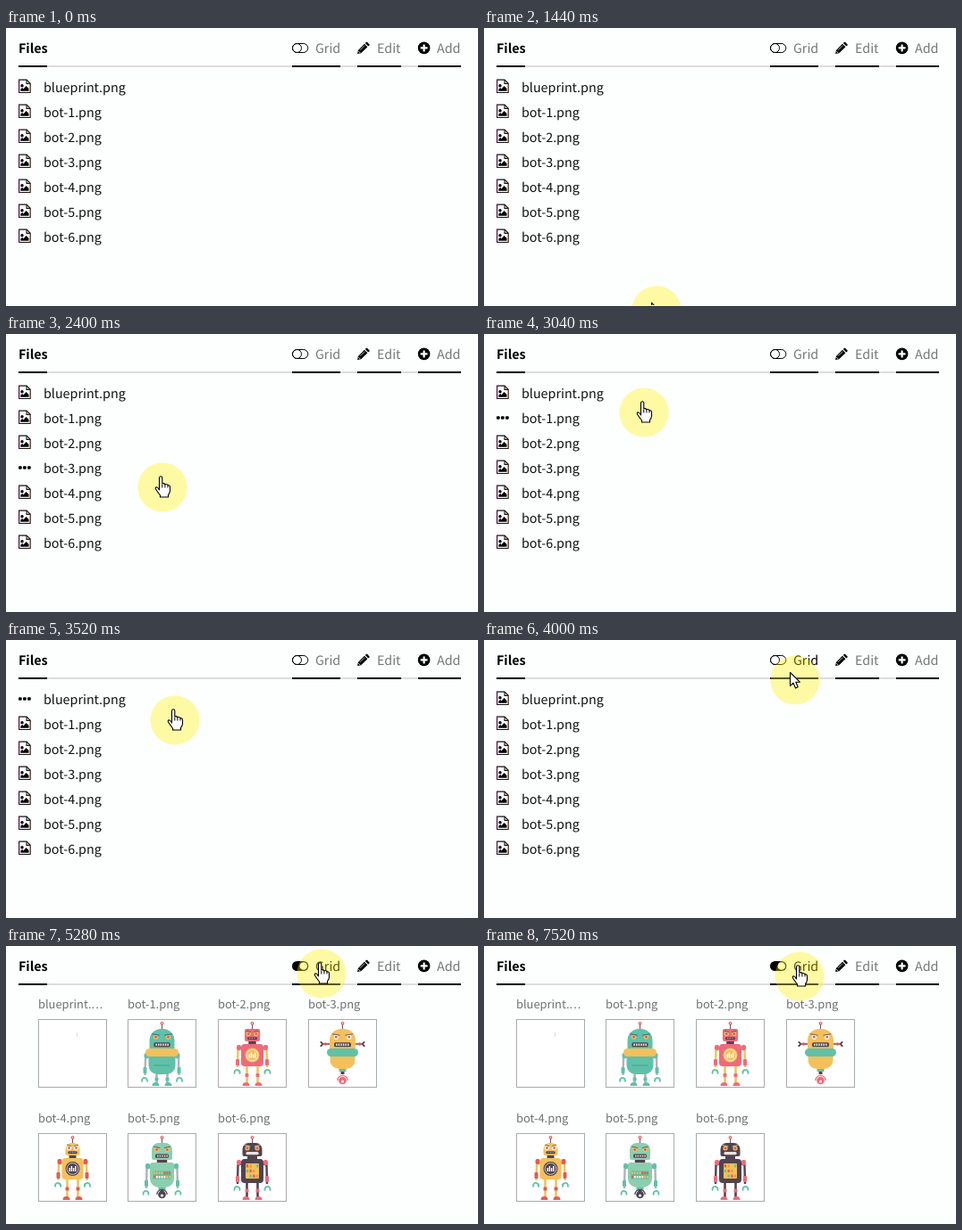
Animation of 528x312 px, one loop 8 s. Source, as an HTML page with a canvas:

```html
<!DOCTYPE html>
<html lang="en">
<head>
<meta charset="utf-8">
<title>Files</title>
<style>
html, body { margin: 0; width: 100%; height: 100%; overflow: hidden; background: #fdfefe; }
canvas { display: block; width: 528px; height: 312px; }
</style>
</head>
<body>
<canvas id="stage" width="528" height="312"></canvas>
<script>
const ctx = document.getElementById('stage').getContext('2d', { alpha: false });
const LOOP = 8000, STEP = 160, TAU = Math.PI * 2;
const FONT = '"Noto Sans CJK JP", "Noto Sans CJK SC", "Noto Sans CJK", "Open Sans", sans-serif';
const FILES = ['blueprint.png', ...[1, 2, 3, 4, 5, 6].map(n => `bot-${n}.png`)];
const BG = '#fdfefe', TEAL = '#5fc1a9', PINK = '#ef6a7b', GOLD = '#f5c05b',
      DARK = '#51434f', RED = '#e05a58', MINT = '#8ccfae', GREY = '#b0b3b8';

// time, x and y of the pointer highlight
const PATH = [
  [1440, 193, 317], [2240, 176, 174], [2400, 175, 172], [3040, 179, 88], [3280, 185, 76],
  [3520, 189, 90], [4000, 348, 45], [4320, 353, 31], [7200, 353, 31], [7520, 353, 34]
];

function pointer(t) {
  if (t < PATH[0][0]) return null;
  const i = PATH.findIndex(p => p[0] > t);
  if (i < 0) return PATH[PATH.length - 1].slice(1);
  const [t0, x0, y0] = PATH[i - 1], [t1, x1, y1] = PATH[i];
  const k = (t - t0) / (t1 - t0);
  return [x0 + (x1 - x0) * k, y0 + (y1 - y0) * k];
}

// The page reacts slightly later than the pointer moves.
function hoverRow(t) {
  const p = pointer(t - 40);
  if (!p || p[0] > 300) return -1;
  const row = Math.floor((p[1] - 64) / 28);
  return row >= 0 && row < FILES.length ? row : -1;
}

function text(s, x, y, size, color, weight = 400) {
  ctx.font = `${weight} ${size}px ${FONT}`;
  ctx.fillStyle = color;
  ctx.fillText(s, x, y);
}
function box(color, x, y, w, h, r = 0) {
  ctx.fillStyle = color;
  ctx.beginPath();
  ctx.roundRect(x, y, w, h, r);
  ctx.fill();
}
function mid(color, y, w, h, r) {
  box(color, -w / 2, y, w, h, r);
}
function dot(color, x, y, r) {
  ctx.fillStyle = color;
  ctx.beginPath();
  ctx.arc(x, y, r, 0, TAU);
  ctx.fill();
}
function trace(pts) {
  ctx.beginPath();
  for (let i = 0; i < pts.length; i += 2) ctx.lineTo(pts[i], pts[i + 1]);
}
function line(color, width, ...pts) {
  trace(pts);
  ctx.strokeStyle = color;
  ctx.lineWidth = width;
  ctx.stroke();
}
function poly(color, ...pts) {
  trace(pts);
  ctx.fillStyle = color;
  ctx.fill();
}
function arc(color, width, x, y, r, a = 0, b = TAU) {
  ctx.beginPath();
  ctx.arc(x, y, r, a, b);
  ctx.strokeStyle = color;
  ctx.lineWidth = width;
  ctx.stroke();
}
function at(x, y, draw) {
  ctx.save();
  ctx.translate(x, y);
  draw();
  ctx.restore();
}
function both(draw) {
  draw();
  ctx.save();
  ctx.scale(-1, 1);
  draw();
  ctx.restore();
}

function fileIcon() {
  const ink = ctx.createLinearGradient(0, 0, 14, 0);
  ink.addColorStop(0, '#4a1040');
  ink.addColorStop(0.3, '#111');
  ink.addColorStop(0.8, '#111');
  ink.addColorStop(1, '#4a2810');
  line(ink, 1.2, 0.6, 0.6, 9, 0.6, 13.2, 4.8, 13.2, 15, 0.6, 15, 0.6, 0);
  line(ink, 1.1, 9, 0.6, 9, 4.9, 13.2, 4.9);
  dot('#000', 4, 7.2, 1.7);
  poly('#000', 2.3, 13.2, 2.3, 11.3, 4.2, 9.6, 5.5, 10.9, 8.6, 7.5, 11.5, 10.5, 11.5, 13.2);
}
function moreIcon() {
  for (let i = 0; i < 3; i++) box('#000', i * 5, 0, 3.7, 3.6, 1.1);
}
function toggleIcon(on) {
  if (on) {
    box('#000', 0, 0, 18.3, 11, 5.5);
    dot(BG, 12.8, 5.5, 4.3);
    return;
  }
  ctx.beginPath();
  ctx.roundRect(0.5, 0.5, 17.3, 10, 5);
  ctx.strokeStyle = '#000';
  ctx.lineWidth = 1;
  ctx.stroke();
  arc('#000', 1, 5.5, 5.5, 5);
}
function pencilIcon() {
  poly('#000', 0, 13.4, 0.9, 9.3, 8, 2.2, 11.4, 5.6, 4.2, 12.6);
  poly('#000', 8.8, 1.4, 10, 0.2, 11, 0.2, 13.4, 2.6, 13.4, 3.6, 12.2, 4.8);
  line(BG, 1, 1.4, 10.6, 3, 12.2);
  line(BG, 0.7, 3, 9.2, 8.2, 4);
}
function addIcon() {
  dot('#000', 0, 0, 6.8);
  box(BG, -4, -1.1, 8, 2.2, 0.4);
  box(BG, -1.1, -4, 2.2, 8, 0.4);
}

function header(t, grid) {
  box('#ddd', 14, 42, 495, 2);
  for (const [x, w] of [[14, 32], [320, 54], [393, 49], [461, 48]]) box('#000', x, 42, w, 2);
  text('Files', 14, 28, 14.32, '#000', 700);
  text('Grid', 346, 28, 14.32, t >= 4000 ? '#000' : '#777');
  text('Edit', 415, 28, 14.32, '#777');
  text('Add', 482, 28, 14.32, '#777');
  at(320, 17, () => toggleIcon(grid));
  at(393, 15.6, pencilIcon);
  at(467.6, 22.4, addIcon);
}

function list(t) {
  const hover = hoverRow(t);
  FILES.forEach((name, i) => {
    const y = 66 + i * 28;
    if (i === hover) at(14, y - 1.8, moreIcon);
    else at(14, y - 8.5, fileIcon);
    text(name, 42, y + 6, 14.32, '#111');
  });
}

// Chest decorations, centred on height y
function dial(ground) {
  return y => {
    dot(ground, 0, y, 8);
    arc('#fff', 0.7, 0, y, 6.4);
    for (let i = 0; i < 4; i++) box('#fff', -4 + i * 2.2, y - 1 - (i % 2) * 2, 1.4, 4 + (i % 2) * 2);
  };
}
function lamps(ground, w, h, cols, rows, colors) {
  return y => {
    mid(ground, y - h / 2, w, h, 1);
    const dx = w / cols, dy = h / rows;
    for (let i = 0; i < cols * rows; i++) {
      const cx = (i % cols + 0.5) * dx - w / 2, cy = y - h / 2 + (Math.floor(i / cols) + 0.5) * dy;
      box(colors[(i * 3 + (i >> 2)) % colors.length], cx - dx * 0.3, cy - dy * 0.28, dx * 0.6, dy * 0.56);
    }
  };
}
const seam = y => mid('#489f8b', y + 2, 18, 1);

// head and body are widths; neck and hip are heights in the frame
const ROBOTS = [
  { skin: TEAL, trim: TEAL, limb: GREY, head: 28, neck: 34, body: 30, hip: 62, dome: 13, belt: GOLD, chest: seam },
  { skin: PINK, trim: PINK, limb: GOLD, head: 17, neck: 25, body: 25, hip: 53, dome: 2, chest: dial(GOLD) },
  { skin: GOLD, trim: PINK, limb: DARK, head: 29, neck: 34, body: 28, hip: 56, dome: 13, belt: TEAL, tail: true, wings: true },
  { skin: GOLD, trim: RED, limb: GOLD, head: 16, neck: 25, body: 24, hip: 52, dome: 7, chest: dial(DARK) },
  { skin: MINT, trim: TEAL, limb: GREY, head: 23, neck: 30, body: 27, hip: 61, dome: 8, tail: true,
    chest: lamps('#6db795', 20, 9, 7, 2, [GOLD, RED, '#fff']) },
  { skin: DARK, trim: PINK, limb: DARK, head: 22, neck: 26, body: 25, hip: 56, dome: 7,
    chest: lamps(GOLD, 15, 17, 4, 3, [RED, TEAL, GOLD, '#e99a42']) }
];

function robot({ skin, trim, limb, head, neck, body, hip, dome, belt, chest, tail, wings }) {
  const tall = neck - 11, eyes = 11 + tall * 0.4, side = body / 2, ink = skin === DARK ? '#e9e4dc' : DARK;
  line(DARK, 0.9, 0, 5, 0, 12);
  dot(RED, 0, 4.8, 1.9);
  dot('#fff', 0, 4.8, 0.7);
  both(() => {
    if (wings) {
      line(DARK, 1.4, side, 28, side + 9, 28);
      dot(RED, side + 5, 28, 1.7);
      arc(DARK, 1.8, side + 11, 28, 2.2, TAU / 4, TAU * 0.75);
    } else {
      line(limb, 2.4, side - 1, neck + 8, side + 3.5, neck + 10, side + 4, hip + 1);
      box(trim, side, neck + 4, 5, 6, 2);
      box(trim, side + 2, hip - 8, 4, 7, 1);
      arc(TEAL, 1.8, side + 4.5, hip + 7, 3, -TAU * 0.58, TAU * 0.08);
    }
    if (!tail) {
      line(limb, 2.6, 6, hip - 2, 6, 72);
      box(trim, 4, (hip + 69) / 2, 4, 4, 1);
      box(trim, 3, 71, 8, 4, [4, 4, 0, 0]);
    }
  });
  if (tail) {
    mid(TEAL, hip - 1, 8, 4);
    mid(DARK, hip + 3, 4, 3);
    dot(wings ? PINK : DARK, 0, 69, 4.3);
    arc(wings ? PINK : DARK, 1.2, 0, 69, 5.6, TAU / 2, TAU);
    dot('#fff', 0, 70, 1.6);
  }
  mid(DARK, neck - 1, head * 0.5, 5);
  mid(skin, 11, head, tall, [dome, dome, 2, 2]);
  mid(skin, neck + 3, body, hip - neck - 3, belt || tail ? [3, 3, 10, 10] : 4);
  if (belt) mid(belt, neck - 1, body + 7, 9, 4.5);
  both(() => {
    dot(skin === GOLD ? '#fff' : GOLD, head * 0.25, eyes, 2.6);
    dot(RED, head * 0.25, eyes, 1.4);
    line(ink, 0.8, head * 0.1, eyes - 2, head * 0.4, eyes - 3.5);
  });
  const jaw = 11 + tall * 0.66, grin = head * 0.65;
  mid(ink, jaw, grin, tall * 0.22, 1.5);
  for (let x = 2 - grin / 2; x < grin / 2 - 2; x += 2.6) box('#e9e4dc', x, jaw + 1.2, 1.5, tall * 0.22 - 2.4);
  if (chest) chest((neck + hip) / 2 + 1.5);
}

function gallery() {
  FILES.forEach((name, i) => {
    const x = Math.floor(36 + (i % 4) * 100.67), y = i < 4 ? 82 : 210;
    const label = i ? name : name.slice(0, 10);
    text(label, x, y - 12, 12.89, '#717171');
    if (!i) for (let k = 0; k < 3; k++) text('.', x + 59.6 + k * 4.6, y - 12, 12.89, '#717171');
    box('#aaa', x, y, 77, 77);
    box('#fff', x + 1, y + 1, 75, 75);
    at(x + 38.5, y, () => i ? robot(ROBOTS[i - 1]) : line('#bbb', 0.5, 5, 15, 5, 20));
  });
}

const ARROW = new Path2D('M-5.5-8.5V6.5L-2 3.2L.5 9L3.2 7.8L.8 2.2H5.3Z');
const HAND = new Path2D('M-3.5 3V-10.5Q-3.3-12.3-1.8-12.3Q-.3-12.3-.2-10.5V-4Q1.5-5 3-3.2' +
  'Q4.8-4.2 6-2.2Q8.5-2.7 8.5.5V4Q8.3 6.5 6.5 8.5V11H-2.5V9Q-5 6-7.5 2Q-8.2 0-6.5-.3Q-5.2-.3-3.5 3Z');

function cursor(t) {
  const p = pointer(t);
  if (!p) return;
  const hand = hoverRow(t) >= 0 || t >= 4160;
  const click = t >= 4800 && t < 5280;
  dot('rgba(255, 242, 0, 0.36)', p[0], p[1], click ? 32 : 27.6);
  at(p[0], p[1], () => {
    const shape = hand ? HAND : ARROW;
    ctx.fillStyle = '#fff';
    ctx.strokeStyle = '#000';
    ctx.lineWidth = 1.1;
    ctx.lineJoin = 'round';
    ctx.fill(shape);
    ctx.stroke(shape);
    if (hand) for (let x = -0.2; x < 7; x += 3.1) line('#000', 1, x, -3.2, x, 0.5);
  });
  box(BG, 0, 311, 528, 1);
}

function draw(now) {
  const t = Math.floor((now % LOOP) / STEP) * STEP;
  const grid = t >= 4960;
  box(BG, 0, 0, 528, 312);
  header(t, grid);
  if (grid) gallery();
  else list(t);
  cursor(t);
}

ctx.textRendering = 'geometricPrecision';
const start = performance.now();
function tick() {
  draw(performance.now() - start);
  requestAnimationFrame(tick);
}
tick();
</script>
</body>
</html>
```
